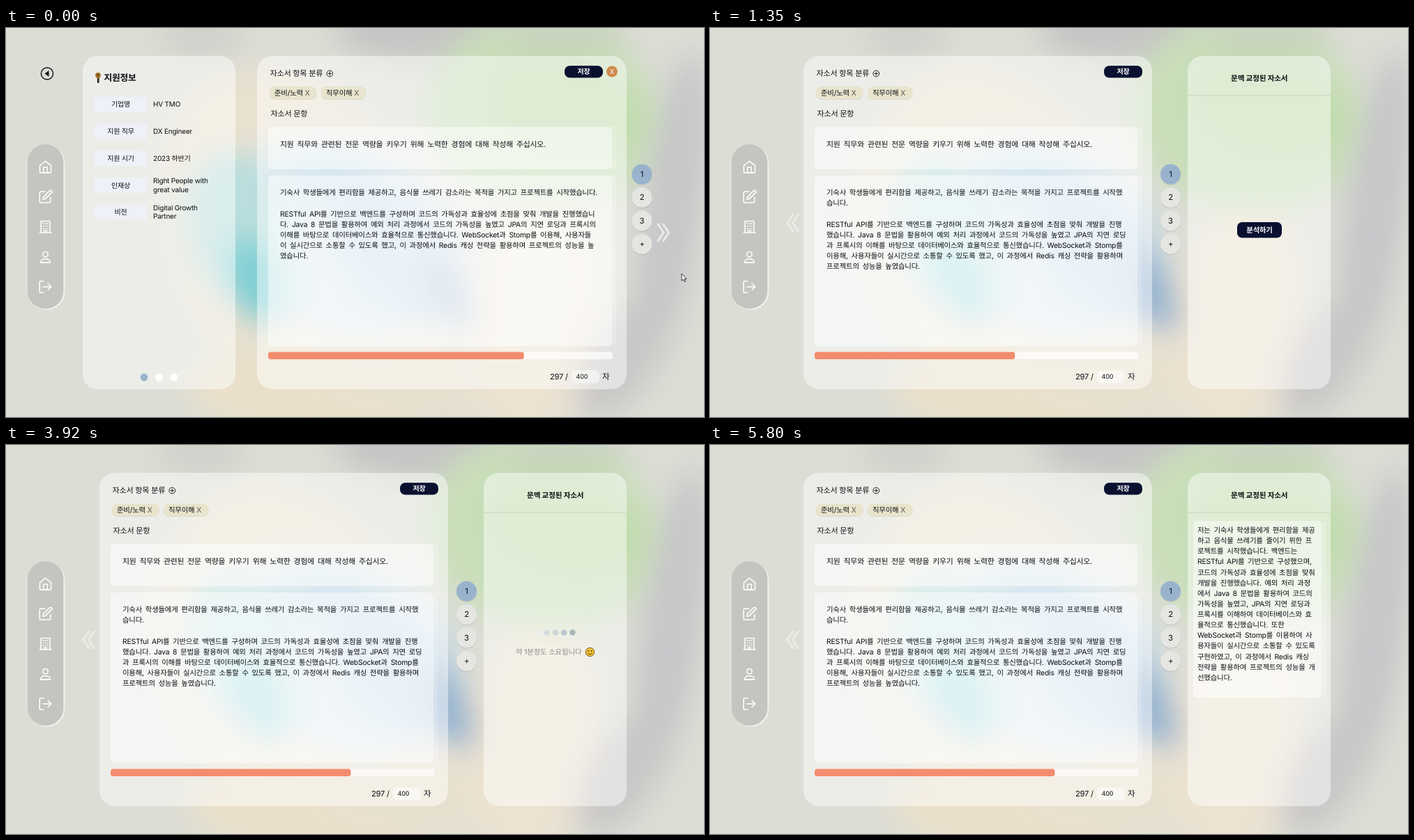
An HTML page that plays this animation: 1001 px wide and 559 px high, repeating every 8.19 s.

```html
<!DOCTYPE html>
<html lang="ko">
<head>
<meta charset="utf-8">
<style>
html, body { margin: 0; width: 100%; height: 100%; overflow: hidden; background: #dcddd5; }
svg { display: block; width: 1001px; height: 559px; }
text {
  font-family: Inter, "Noto Sans CJK KR", "Noto Sans CJK JP", sans-serif;
  letter-spacing: -.02em; fill: #0c0d12; text-rendering: geometricPrecision; white-space: pre;
}
.mid { text-anchor: middle; }
.bold { font-weight: 600; }
.prose { word-spacing: .195em; }
.light { fill: #fff; }
.dim { fill: #8b918a; font-weight: 500; }
.thin { fill: #55544c; }
.line { fill: none; stroke-linecap: round; stroke-linejoin: round; }
</style>
</head>
<body>
<svg id="stage" viewBox="0 0 1001 559" xmlns="http://www.w3.org/2000/svg"></svg>
<script>
const LOOP = 8190, SWITCH = 820, LOADING = 1790, RESULT = 5800;
const NAVY = '#0a1130', BLUE = '#9ab3cd';

const rect = (x, y, w, h, r, fill, extra = '') =>
  `<rect x="${x}" y="${y}" width="${w}" height="${h}" rx="${r}" fill="${fill}" ${extra}/>`;
const circle = (x, y, r, fill, extra = '') =>
  `<circle cx="${x}" cy="${y}" r="${r}" fill="${fill}" ${extra}/>`;
const line = (d, color, width, extra = '') =>
  `<path class="line" d="${d}" stroke="${color}" stroke-width="${width}" ${extra}/>`;
// y is the vertical middle of the text line
const text = (x, y, size, str, cls = '') =>
  `<text x="${x}" y="${y + size * .345}" font-size="${size}" class="${cls}">${str}</text>`;
const lines = (x, y, size, step, list, cls = '') =>
  list.map((s, i) => text(x, y + i * step, size, s, cls)).join('');
const group = (id, body, extra = '') => `<g id="${id}" ${extra}>${body}</g>`;
const white = a => `rgba(255,255,255,${a})`;
const panel = (x, w) => rect(x, 40, w, 479, 22, white(.46));
const field = (x, y, w, h) =>
  rect(x, y, w, h, 5, white(.47)) + rect(x + w, y, 6, h, 3, white(.18));

function backdrop() {
  // cx, cy, rx, ry, turn, colour
  const blobs = [
    [440, 330, 185, 290, -28, '#e9e1cf'], [430, 530, 170, 60, 5, '#eae0ca'],
    [600, 510, 150, 50, 0, '#e8e0cf'], [755, 430, 90, 190, 8, '#ebe2d1'],
    [590, 0, 120, 50, 0, '#c6c5c4'], [280, 10, 60, 30, 0, '#d0cfca'],
    [770, 125, 170, 140, 12, '#c9deba'], [800, 115, 110, 70, 15, '#bfdcab'],
    [800, 10, 90, 30, 0, '#c8d3bd'],
    [955, 260, 42, 230, 8, '#c7c6c9'], [885, 470, 50, 100, 30, '#c9c8c7'],
    [480, 300, 175, 135, 28, '#cadfe5'], [335, 290, 75, 115, -15, '#b9dedd'],
    [560, 320, 70, 125, -40, '#b4cde2'], [635, 380, 28, 62, -25, '#94b2cf'],
    [450, 215, 70, 28, -12, '#b4d1e2'], [360, 365, 42, 68, -25, '#80d0d4']
  ];
  return '<filter id="soft" x="-20%" y="-20%" width="140%" height="140%"><feGaussianBlur stdDeviation="20"/></filter>' +
    rect(0, 0, 1001, 559, 0, '#dcddd5') +
    group('blobs', blobs.map(([x, y, rx, ry, turn, fill]) =>
      `<ellipse cx="${x}" cy="${y}" rx="${rx}" ry="${ry}" fill="${fill}" transform="rotate(${turn} ${x} ${y})"/>`
    ).join(''), 'filter="url(#soft)"');
}

function sidebar() {
  const icons = [
    'M3.3 9.8 12 3l8.7 6.8V20q0 1.3-1.3 1.3H4.6Q3.3 21.300 3.300 20ZM9 21v-8.500h6V21',
    'M11 4H5a2 2 0 0 0-2 2v13a2 2 0 0 0 2 2h13a2 2 0 0 0 2-2v-6M18.5 2.5a2.1 2.1 0 0 1 3 3L12 15l-4 1 1-4Z',
    'M5 21V3h14v18M3 21h18M10 21v-3h4v3M8.5 7h.6m2.6 0h.6m2.6 0h.6M8.5 11h.6m2.6 0h.6m2.6 0h.6M8.5 15h.6m2.6 0h.6m2.6 0h.6',
    'M12 12a4 4 0 1 0 0-8 4 4 0 0 0 0 8ZM4.500 21c0-8 15-8 15 0Z',
    'M9 21H4a1 1 0 0 1-1-1V4a1 1 0 0 1 1-1h5M8 12h13m-5-5 5 5-5 5'
  ];
  return rect(32, 168, 52.5, 237, 26, '#f1f2ed') + rect(31, 167, 51.5, 236.5, 25.7, '#c3c5c0') +
    icons.map((d, i) => line(d, '#fff', 1.7,
      `transform="translate(45.5 ${188.5 + i * 43.1}) scale(.92)"`)).join('');
}

function infoCard() {
  const rows = [
    ['기업명', ['HV TMO']], ['지원 직무', ['DX Engineer']], ['지원 시기', ['2023 하반기']],
    ['인재상', ['Right People with', 'great value']], ['비전', ['Digital Growth', 'Partner']]
  ];
  return circle(59, 65.5, 8.6, 'none', 'stroke="#15171c" stroke-width="1.5"') +
    '<path d="M61.5 61v9l-6-4.5Z" fill="#15171c"/>' + panel(110, 219) +
    rect(130.8, 69, 2.8, 10, 1, '#33291f') + circle(132, 68, 3.9, '#a8752c') + circle(132, 67.4, 1.7, '#5f4524') +
    text(140.5, 71.5, 12.8, '지원정보', 'bold') +
    rows.map(([label, value], i) => {
      const y = 110 + i * 38.7;
      return rect(127, y - 11, 75, 22, 3, '#eef1f8') + text(164.5, y, 10, label, 'mid') +
        lines(211, y - (value.length - 1) * 6.2, 10, 12.4, value);
    }).join('') +
    [198, 219.5, 241].map((x, i) => circle(x, 502, 5.4, i ? '#fff' : BLUE)).join('');
}

function editor(x, w, saveX, body) {
  const right = x + w, track = w - 36;
  const chip = (dx, cw, label) =>
    rect(x + dx, 84.8, cw, 18, 8, 'rgba(120,115,90,.22)') + rect(x + dx, 84, cw, 18, 8, '#e8e4cd') +
    text(x + dx + 7, 93, 10.4, `${label} <tspan class="thin">X</tspan>`);
  return panel(x, w) + text(x + 18.5, 65.5, 11.1, '자소서 항목 분류') +
    circle(x + 104.3, 65.5, 4.4, 'none', 'stroke="#222" stroke-width="1"') +
    line(`M${x + 102} 65.5h4.6m-2.3-2.3v4.6`, '#222', 1) +
    chip(18, 67.5, '준비/노력') + chip(92, 64.5, '직무이해') +
    text(x + 19.5, 123.5, 11.1, '자소서 문항') +
    rect(saveX, 54.3, 55, 17.2, 7.5, NAVY) + text(saveX + 27.5, 62.7, 10, '저장', 'mid light bold') +
    field(x + 16, 142, track - 1, 61) +
    text(x + 33, 167, 10.9, '지원 직무와 관련된 전문 역량을 키우기 위해 노력한 경험에 대해 작성해 주십시오.', 'prose') +
    field(x + 16, 212, track - 1, 245) + lines(x + 33, 236.8, 10.4, 15.07, body, 'prose') +
    rect(x + 16, 465.5, track, 10.5, 3.5, white(.7)) +
    rect(x + 16, 465.5, track * 297 / 400, 10.5, 3.5, '#f38c6f', 'class="bar"') +
    text(right - 110, 501.5, 11.2, '297 /') + rect(right - 79, 492, 40, 18.5, 6, white(.5)) +
    text(right - 72.5, 501.3, 9, '400') + text(right - 35, 501.5, 11.5, '자');
}

const pager = x => ['1', '2', '3', '+'].map((s, i) => {
  const y = 210 + i * 33.5;
  return circle(x, y + 1, 14.8, 'rgba(90,90,90,.14)') + circle(x, y, 14.5, i ? '#e5e6e2' : BLUE) +
    text(x, y, 11.3, s, 'mid');
}).join('');

const chevrons = (x, y, dir) => [0, 7.5].map(dx =>
  line(`M${x + dx * dir} ${y - 12}l${8 * dir} 12l${-8 * dir} 12`, '#ebece8', 3)).join('');

function sceneOne() {
  return infoCard() + editor(360, 530, 801, [
    '기숙사 학생들에게 편리함을 제공하고, 음식물 쓰레기 감소라는 목적을 가지고 프로젝트를 시작했습니다.', '',
    'RESTful API를 기반으로 백엔드를 구성하며 코드의 가독성과 효율성에 초점을 맞춰 개발을 진행했습니',
    '다. Java 8 문법을 활용하여 예외 처리 과정에서 코드의 가독성을 높였고 JPA의 지연 로딩과 프록시의',
    '이해를 바탕으로 데이터베이스와 효율적으로 통신했습니다. WebSocket과 Stomp를 이용해, 사용자들',
    '이 실시간으로 소통할 수 있도록 했고, 이 과정에서 Redis 캐싱 전략을 활용하며 프로젝트의 성능을 높',
    '였습니다.'
  ]) + circle(869, 62.5, 8, '#d18b4e') + text(869, 62.5, 9.5, 'X', 'mid light') +
    pager(912) + chevrons(935, 294, 1) + group('press', circle(935.7, 291.3, 9.5, '#f0ea40', 'opacity=".8"'));
}

function sceneTwo() {
  const shades = ['#e9eeeb', '#d5dde0', '#cad4d9', '#bac7cd', '#a8b7bc'];
  const smiley = circle(837.5, 297.5, 6.2, '#f4c638', 'stroke="#6b4b16" stroke-width=".9"') +
    circle(835.3, 296, 1, '#4b3410') + circle(839.7, 296, 1, '#4b3410') +
    line('M834.3 299.3q3.2 3.2 6.4 0', '#4b3410', 1);
  return editor(134, 500, 565, [
    '기숙사 학생들에게 편리함을 제공하고, 음식물 쓰레기 감소라는 목적을 가지고 프로젝트를 시작했',
    '습니다.', '',
    'RESTful API를 기반으로 백엔드를 구성하며 코드의 가독성과 효율성에 초점을 맞춰 개발을 진행',
    '했습니다. Java 8 문법을 활용하여 예외 처리 과정에서 코드의 가독성을 높였고 JPA의 지연 로딩',
    '과 프록시의 이해를 바탕으로 데이터베이스와 효율적으로 통신했습니다. WebSocket과 Stomp를',
    '이용해, 사용자들이 실시간으로 소통할 수 있도록 했고, 이 과정에서 Redis 캐싱 전략을 활용하며',
    '프로젝트의 성능을 높였습니다.'
  ]) + chevrons(126.5, 280, -1) + pager(660.5) + panel(685, 205) +
    text(787.7, 72, 10.6, '문맥 교정된 자소서', 'mid bold') +
    line('M685 97h205', 'rgba(150,165,145,.35)', 1) +
    group('ask', rect(756, 279, 64, 22.5, 7, NAVY) + text(788, 290.3, 10.4, '분석하기', 'mid light bold')) +
    group('loader', shades.map((c, i) => circle(763.3 + i * 12.3, 269.5, 4.2, c, 'class="dot"')).join('') +
      text(731, 297.5, 10.5, '약 1분정도 소요됩니다', 'dim') + smiley) +
    group('result', field(693, 109, 184, 254) + lines(699, 122.5, 10.4, 15.12, [
      '저는 기숙사 학생들에게 편리함을 제공', '하고 음식물 쓰레기를 줄이기 위한 프',
      '로젝트를 시작했습니다. 백엔드는', 'RESTful API를 기반으로 구성했으며,',
      '코드의 가독성과 효율성에 초점을 맞춰', '개발을 진행했습니다. 예외 처리 과정',
      '에서 Java 8 문법을 활용하여 코드의', '가독성을 높였고, JPA의 지연 로딩과',
      '프록시를 이해하여 데이터베이스와 효', '율적으로 통신했습니다. 또한',
      'WebSocket과 Stomp를 이용하여 사', '용자들이 실시간으로 소통할 수 있도록',
      '구현하였고, 이 과정에서 Redis 캐싱', '전략을 활용하여 프로젝트의 성능을 개', '선했습니다.'
    ], 'prose'));
}

const $ = s => document.querySelector(s);
$('#stage').innerHTML = backdrop() + sidebar() + group('one', sceneOne()) + group('two', sceneTwo()) +
  '<path id="arrow" d="M0 0V10.2L2.3 8.2 4 11.7 5.6 11 4 7.6H7Z" fill="#fff" stroke="#222" stroke-width=".9"/>' +
  '<path id="hand" d="M3.4 7.5V1.2q0-1.2 1-1.2t1 1.2V5l3.2.7q1.4.3 1.3 1.8-.2 3.4-1.3 5.6H4.2L.8 8.6q-.6-1 .4-1.5Z" fill="#fff4a8" stroke="#222" stroke-width=".9"/>';

// start time, cursor shape, x, y
const cursorSteps = [
  [0, 'arrow', 969, 353], [180, 'arrow', 957, 335], [270, 'arrow', 946.5, 318.5],
  [510, 'hand', 932.5, 291], [SWITCH, 'arrow', 936.5, 291.5], [898, 'none', 0, 0]
];
// start time, delay from dot to dot
const waves = [[2080, 78], [2930, 78], [4092, 91], [5000, 78]];
const dots = document.querySelectorAll('.dot'), bar = $('#two .bar');
const fullBar = 464 * 297 / 400;

const show = (sel, on) => $(sel).style.display = on ? '' : 'none';
const smooth = x => { x = Math.min(1, Math.max(0, x)); return x * x * (3 - 2 * x); };

function lift(t, i) {
  return Math.max(...waves.map(([start, delay]) => {
    const p = (t - start - i * delay) / (8 * delay);
    return p > 0 && p < 1 ? 5.2 * (1 - Math.cos(2 * Math.PI * p)) : 0;
  }));
}

function draw(t) {
  show('#one', t < SWITCH);
  show('#two', t >= SWITCH);
  show('#press', t >= 650);
  show('#ask', t < LOADING);
  show('#loader', t >= LOADING && t < RESULT);
  show('#result', t >= RESULT);

  const [, shape, x, y] = cursorSteps.filter(s => s[0] <= t).pop();
  for (const id of ['arrow', 'hand']) {
    show('#' + id, id === shape);
    $('#' + id).setAttribute('transform', `translate(${x} ${y})`);
  }

  const held = SWITCH + Math.floor((t - SWITCH) / 77.8) * 77.8;
  bar.setAttribute('width', fullBar * smooth((held - 575) / 960));
  dots.forEach((dot, i) => dot.setAttribute('cy', 269.5 - lift(t, i)));
}

const began = performance.now();
function tick() {
  draw((performance.now() - began) % LOOP);
  requestAnimationFrame(tick);
}
tick();
</script>
</body>
</html>
```
